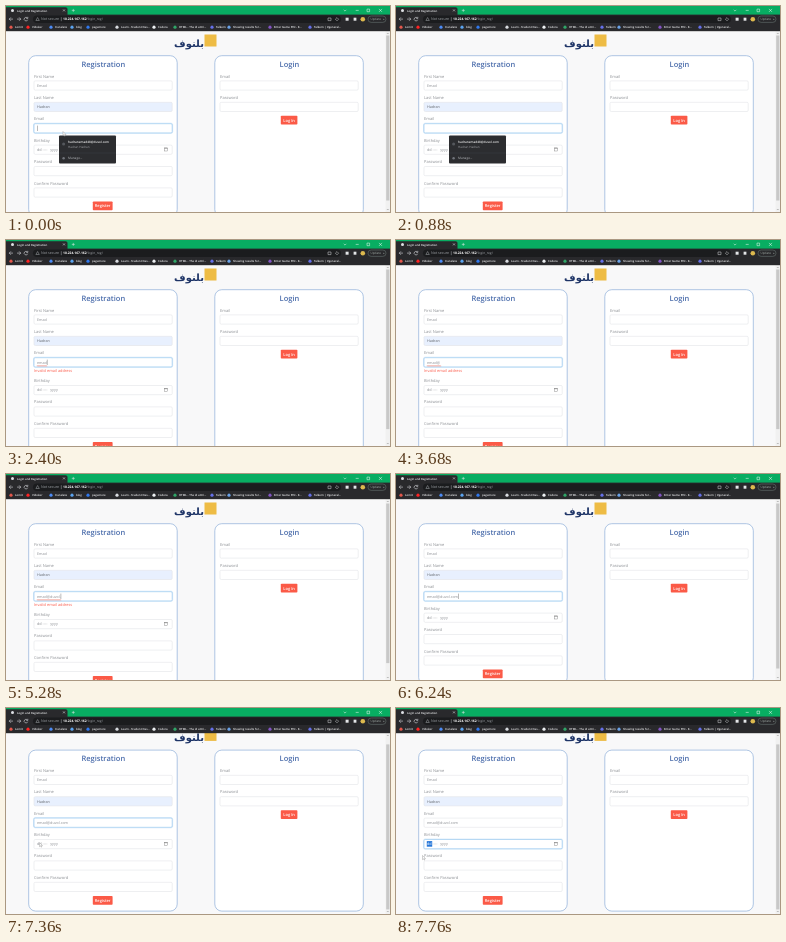
These frames come from a looping animation (384 by 206 pixels, 8 s). An HTML page:

```html
<!DOCTYPE html>
<html lang="en">
<head>
<meta charset="utf-8">
<title>Login and Registration</title>
<style>
html, body { margin: 0; width: 100%; height: 100%; overflow: hidden; background: #f8f8f9; }
svg { display: block; width: 100vw; height: 100vh; }
text { font-family: "Open Sans", "Noto Sans", sans-serif; text-rendering: geometricPrecision; }
</style>
</head>
<body>
<svg id="stage" viewBox="0 0 384 206" preserveAspectRatio="none"></svg>
<script>
const LOOP = 8000;
const ERROR_SHIFT = 6.4;
const SCROLL = 7.6;
const BLUE = "#8cc2ec";
const BORDER = "#e2e4e7";
const INK = "#8b8e93";
const stage = document.getElementById("stage");

function add(parent, tag, attrs, content) {
  const node = document.createElementNS("http://www.w3.org/2000/svg", tag);
  set(node, attrs);
  if (content !== undefined) node.textContent = content;
  parent.appendChild(node);
  return node;
}
function set(node, attrs) {
  for (const key in attrs) node.setAttribute(key, attrs[key]);
}
const group = (parent, attrs = {}) => add(parent, "g", attrs);
const rect = (parent, x, y, width, height, fill, more = {}) =>
  add(parent, "rect", { x, y, width, height, fill, ...more });
const circle = (parent, cx, cy, r, fill) => add(parent, "circle", { cx, cy, r, fill });
const line = (parent, d, stroke, width = 0.6) =>
  add(parent, "path", { d, stroke, fill: "none", "stroke-width": width });
const label = (parent, x, y, content, size, fill, more = {}) =>
  add(parent, "text", { x, y, "font-size": size, fill, ...more }, content);
const show = (node, on) => set(node, { visibility: on ? "visible" : "hidden" });
const clamp = v => Math.max(0, Math.min(1, v));
const smooth = v => clamp(v) ** 2 * (3 - 2 * clamp(v));

// Page
rect(stage, 0, 0, 384, 206, "#f8f8f9");
const page = group(stage);
label(page, 183, 40.6, "بلنوف", 10, "#1e3467",
  { "text-anchor": "middle", "font-weight": 700, style: 'font-family:"DejaVu Sans",sans-serif' });
rect(page, 198.5, 28.5, 12, 12, "#eebc45");

function card(x, title) {
  const box = rect(page, x, 49.7, 148.5, 161, "#fff",
    { rx: 7, stroke: "#94b3db", "stroke-width": 0.75 });
  label(page, x + 74.6, 60.6, title, 7.5, "#4a6cab", { "text-anchor": "middle", "font-weight": 600 });
  return box;
}
function field(parent, x, row, name, value = "", fill = "#fff") {
  const y = 74.9 + row * 21.4;
  label(parent, x, y - 3.4, name, 4, INK);
  const glow = rect(parent, x - 0.5, y - 0.5, 139.2, 10.2, "none",
    { rx: 1.6, stroke: "#dcecfa", "stroke-width": 1, opacity: 0 });
  const box = rect(parent, x, y, 138.2, 9.2, fill, { rx: 1.2, stroke: BORDER, "stroke-width": 0.6 });
  const text = label(parent, x + 3, y + 6, value, 3.7, INK);
  return { box, glow, text };
}
function button(parent, x, y, width, name) {
  rect(parent, x, y, width, 8.8, "#fb5a47", { rx: 0.8 });
  label(parent, x + width / 2, y + 5.8, name, 4, "#fff", { "text-anchor": "middle", "font-weight": 600 });
}
function focus(input, amount) {
  set(input.glow, { opacity: amount });
  set(input.box, { stroke: amount > 0.5 ? BLUE : BORDER });
}

const cards = [card(22.7, "Registration"), card(208.8, "Login")];
field(page, 214, 0, "Email");
field(page, 214, 1, "Password");
button(page, 274.8, 109.8, 16.6, "Log In");

field(page, 28, 0, "First Name", "Emad");
const lastName = field(page, 28, 1, "Last Name", "Hadran", "#e8f0fe");
set(lastName.text, { fill: "#63676d" });
const email = field(page, 28, 2, "Email");
const squiggle = line(page, "", "#f0604f", 0.45);
const caret = rect(page, 31, 119.6, 0.4, 5.4, "#555");
const error = label(page, 28, 132.1, "Invalid email address", 3.9, "#fa5b4b");

const lower = group(page);
const birthday = field(lower, 28, 3, "Birthday");
const dayMark = rect(lower, 30.8, 140.7, 5.4, 5.6, "#2677d9");
const day = label(lower, 31, 145, "dd", 3.8, INK);
label(lower, 36.6, 145, "----", 3.8, INK);
label(lower, 44.2, 145, "yyyy", 3.8, INK);
rect(lower, 158.5, 141.9, 3, 3.1, "none", { stroke: "#777", "stroke-width": 0.4 });
line(lower, "M158.4 142.3h3.2", "#777", 0.6);
field(lower, 28, 4, "Password");
field(lower, 28, 5, "Confirm Password");
button(lower, 86.8, 195.5, 19.8, "Register");

// Autofill popup
const popup = group(stage);
rect(popup, 53, 129.6, 57, 28, "#2c2d30", { rx: 1 });
circle(popup, 57.6, 138, 1.5, "#55585d");
label(popup, 62, 137.1, "hadranemad48@duvol.com", 3.1, "#f2f2f2", { "font-weight": 600 });
label(popup, 62, 142, "Hadran Hadran", 3, "#a4a6aa");
line(popup, "M53 147h57", "#414347", 0.4);
circle(popup, 57.6, 152.2, 1.2, "#70747a");
label(popup, 62, 153.4, "Manage...", 3.2, "#b5b7bb");

// Scrollbar
rect(stage, 379.6, 25, 4.4, 181, "#f1f1f1");
const thumb = rect(stage, 380.2, 29.5, 3.2, 165, "#c8c8c8");
line(stage, "M380.9 28l.9-1 .9 1M380.9 203l.9 1 .9-1", "#888", 0.5);

// Browser frame
const BAR = "#29292c";
rect(stage, 0, 0, 384, 9, "#08ad62");
add(stage, "path", { d: "M0 9V1.2H59.5Q61.5 1.2 61.5 3V9Z", fill: BAR });
circle(stage, 6.5, 4.4, 1.5, "#dfe1e5");
label(stage, 11, 5.5, "Login and Registration", 2.8, "#f0f1f3", { "font-weight": 600 });
line(stage, "M57 3.4l2 2m0-2l-2 2M65.8 4.4h3M67.3 2.9v3", "#e8eaed", 0.5);
line(stage, "M337.7 3.8l1.3 1.3 1.3-1.3M349.7 4.4h3M361 3.1h2.6v2.6h-2.6zM373 2.9l3 3m0-3l-3 3", "#f4fff8", 0.5);
rect(stage, 0, 8.6, 384, 16.6, BAR);
line(stage, "M7 13.1H3.2m1.7-1.7l-1.7 1.7 1.7 1.7M11 13.1h3.8m-1.7-1.7l1.7 1.7-1.7 1.7", "#d4d6d9", 0.6);
line(stage, "M21.4 12a1.8 1.8 0 1 0 .3 1.7M21.8 10.8v1.6h-1.6", "#d4d6d9", 0.6);
rect(stage, 27, 9.5, 308, 7.4, "#1b1c1e", { rx: 3.7 });
line(stage, "M31.6 11.5l1.7 3h-3.4zM55.3 11.2v4", "#a4a8ad", 0.5);
label(stage, 35, 14.4, "Not secure", 3.6, "#a4a8ad");
const address = label(stage, 57, 14.4, "10.224.167.162", 3.3, "#fff", { "font-weight": 700 });
add(address, "tspan", { fill: "#a4a8ad", "font-weight": 400 }, "/login_reg/");
line(stage, "M322 12h3v2.6h-3zM329.4 13.2l1.6-1.6 1.6 1.6-1.6 1.6z", "#d4d6d9", 0.5);
rect(stage, 339.6, 11.7, 3, 3, "#e4e6e8");
rect(stage, 347.6, 11.7, 2.8, 3, "#e4e6e8");
circle(stage, 356.8, 13.2, 2.3, "#ddb94e");
rect(stage, 362, 10, 18, 6.4, BAR, { rx: 3.2, stroke: "#6f7d78", "stroke-width": 0.5 });
label(stage, 364.4, 14.3, "Update", 3.1, "#a3aca8");
circle(stage, 377.8, 13.2, 0.5, "#a3aca8");

[
  [9, "Lomit", "#e2574c"], [26, "Vidoker", "#f22"], [49, "translate", "#4c8bf5"],
  [70, "blog", "#5ba3ee"], [86, "pagemore", "#2f78ee"],
  [115, "Learn - Student Das...", "#d8dbe0"], [152, "Codora", "#eceff1"],
  [173, "HTML - The id attri...", "#2fa567"], [210, "Talkern", "#6570e8"],
  [227, "Showing results for...", "#6aa2e8"], [268, "Enter Game PIN - K...", "#8355c4"],
  [308, "Talkern | #general...", "#6570e8"]
].forEach(([x, name, color]) => {
  circle(stage, x - 4, 21.2, 1.6, color);
  label(stage, x, 22.3, name, 2.8, "#f0f1f3", { "font-weight": 600 });
});

const pointer = add(stage, "path", {
  d: "M0 0V4.2L1 3.3 1.7 4.7 2.3 4.4 1.7 3.1H3Z",
  fill: "#fff", stroke: "#777", "stroke-width": 0.35
});

// Motion
const ADDRESS = "emad@duvol.com";
const KEYS = [1040, 1360, 1520, 1920, 3120, 3920, 4560, 4640, 4800, 5040, 5280, 5360, 5520, 5750];
const VALID_AT = 5520;
const SCROLL_AT = 6800;
const CLICK_AT = 7600;
const PATH = [[6720, 56, 129], [6900, 56, 129], [7360, 33.5, 134.5], [7590, 31, 137], [7760, 26.5, 147.5]];

function pointerAt(t) {
  if (t < 320) return [57, 125.5];
  const next = PATH.findIndex(p => p[0] > t);
  if (next === 0) return PATH[0].slice(1);
  if (next < 0) return PATH[PATH.length - 1].slice(1);
  const [a, b] = [PATH[next - 1], PATH[next]];
  const k = (t - a[0]) / (b[0] - a[0]);
  return [1, 2].map(i => a[i] + (b[i] - a[i]) * k);
}

function drawSquiggle(width) {
  let d = "M31 125.9";
  for (let x = 0; x < width; x += 1) d += "q.25-.7.5 0t.5 0";
  set(squiggle, { d });
}

function render(t) {
  const count = KEYS.filter(k => k <= t).length;
  const invalid = count > 0 && t < VALID_AT;
  const shift = invalid ? ERROR_SHIFT : 0;
  const scrolled = SCROLL * smooth((t - SCROLL_AT) / 360);
  const clicked = t >= CLICK_AT;

  email.text.textContent = ADDRESS.slice(0, count);
  const width = count ? email.text.getComputedTextLength() : 0;
  const lastKey = count ? KEYS[count - 1] : -110;
  set(caret, { x: 31.1 + width });
  show(caret, !clicked && (t - lastKey) % 1000 < 500);
  show(squiggle, invalid && count >= 4);
  drawSquiggle(width);
  show(error, invalid);
  show(popup, count === 0);

  set(lower, { transform: `translate(0 ${shift})` });
  cards.forEach(c => set(c, { height: 161 + shift }));
  set(page, { transform: `translate(0 ${-scrolled})` });
  set(thumb, { y: 29.5 + scrolled * 0.91, height: 165 - shift * 0.84 });

  const swap = clamp((t - CLICK_AT) / 150);
  focus(email, 1 - swap);
  focus(birthday, swap);
  show(dayMark, clicked);
  set(day, { fill: clicked ? "#fff" : INK });

  show(pointer, t < 320 || t >= PATH[0][0]);
  set(pointer, { transform: `translate(${pointerAt(t).join(" ")})` });
}

function tick() {
  render(performance.now() % LOOP);
  requestAnimationFrame(tick);
}
tick();
</script>
</body>
</html>
```
